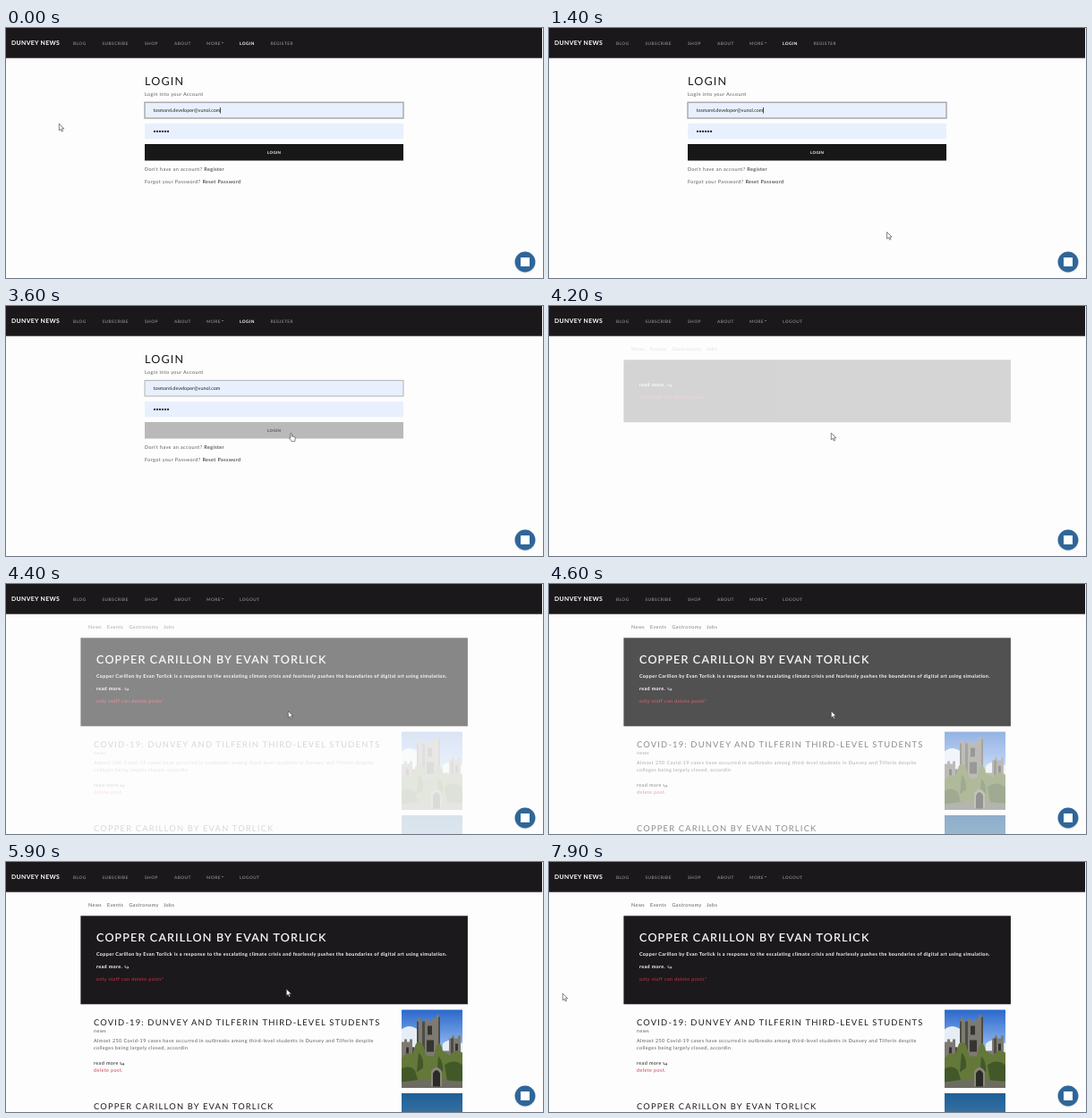
These frames come from a looping animation (600x280 px, 8000 ms). An HTML page:

```html
<!DOCTYPE html>
<html lang="en">
<head>
<meta charset="utf-8">
<title>Login demo</title>
<style>
  html, body { margin: 0; width: 100%; height: 100%; overflow: hidden; background: #fdfdfd; }
  svg { display: block; }
  text {
    font: 5.45px Lato, "Open Sans", sans-serif;
    letter-spacing: .4px;
    fill: #55595c;
    text-rendering: geometricPrecision;
    white-space: pre;
  }
  .nav text { font-size: 4.75px; font-weight: 700; letter-spacing: .45px; fill: #838283; }
  .nav .brand { font-size: 6.9px; letter-spacing: .33px; }
  .nav .brand, .nav .on, .card text { fill: #fff; }
  .h1 { font-size: 12.55px; letter-spacing: 1.17px; }
  .h2 { font-size: 9.4px; letter-spacing: 1.17px; }
  .dark, .link { fill: #1a1a1a; }
  .card .h1 { stroke: #fff; stroke-width: .2px; }
  .card .bold { font-weight: 700; letter-spacing: .33px; }
  .card .red, .red { fill: #d2364a; }
  .field { fill: #e8f0fe; }
  .input { letter-spacing: 0; fill: #222; }
  #label { font-size: 4.4px; font-weight: 700; letter-spacing: .35px; text-anchor: middle; }
  .arrow { fill: none; stroke-width: .6; }
</style>
</head>
<body>
<svg width="600" height="280" viewBox="0 0 600 280">
  <defs>
    <linearGradient id="sky" x2="0" y2="1">
      <stop stop-color="#2a68cc"/><stop offset=".4" stop-color="#7fabe8"/><stop offset=".7" stop-color="#d5e0ee"/>
    </linearGradient>
    <linearGradient id="dusk" x2="0" y2="1">
      <stop stop-color="#1f5f98"/><stop offset="1" stop-color="#336f9f"/>
    </linearGradient>
    <path id="turn" class="arrow" d="M0 0v2.4h4M2.6 1l1.5 1.4l-1.5 1.4"/>
  </defs>

  <g class="nav">
    <rect width="599" height="33.7" fill="#1a181a"/>
    <text class="brand" x="6" y="19">DUNVEY NEWS</text>
    <g id="menu"></g>
    <path d="M240.7 15.9h2.6l-1.3 1.4z" fill="#8c8b8c"/>
  </g>

  <g id="login">
    <text class="h1 dark" x="155" y="63.6">LOGIN</text>
    <text x="155" y="75.6">Login into your Account</text>
    <rect id="email" class="field" x="155" y="83.3" width="289" height="17.7" stroke="#a9abae"/>
    <text class="input" x="164.5" y="94.2">tosmarel.developer@vunol.com</text>
    <rect id="caret" x="239.2" y="89" width=".7" height="6.5"/>
    <rect class="field" x="155" y="107" width="289" height="17.3"/>
    <path d="M166 115.8h16" stroke="#111" stroke-width="2.3" stroke-linecap="round" stroke-dasharray="0 3"/>
    <rect id="button" x="155" y="130" width="289" height="18.5"/>
    <text id="label" x="299.7" y="140.9">LOGIN</text>
    <text x="155" y="160.2">Don't have an account? <tspan class="link">Register</tspan></text>
    <text x="155" y="174.2">Forgot your Password? <tspan class="link">Reset Password</tspan></text>
  </g>

  <g id="blog">
    <g id="top">
      <g id="tabs"></g>
      <g class="card">
        <rect id="panel" x="83.4" y="60.3" width="432.5" height="99" fill="#1b191b"/>
        <g id="intro">
          <text class="h1" x="101" y="89.4">COPPER CARILLON BY EVAN TORLICK</text>
          <text class="bold" x="101" y="104.6">Copper Carillon by Evan Torlick is a response to the escalating climate crisis and fearlessly pushes the boundaries of digital art using simulation.</text>
        </g>
        <g id="more">
          <text class="bold" x="101" y="119">read more.</text>
          <use href="#turn" x="133" y="115.8" stroke="#fff"/>
          <text class="red" x="101" y="133">only staff can delete posts*</text>
        </g>
      </g>
    </g>
    <g id="posts">
      <text class="h2 dark" x="98" y="183.2">COVID-19: DUNVEY AND TILFERIN THIRD-LEVEL STUDENTS</text>
      <text x="98" y="191.2">news</text>
      <text x="98" y="202.2">Almost 250 Covid-19 cases have occurred in outbreaks among third-level students in Dunvey and Tilferin despite</text>
      <text x="98" y="210.2">colleges being largely closed, accordin</text>
      <text class="link" x="98" y="227.2">read more</text>
      <use href="#turn" x="128" y="224" stroke="#1a1a1a"/>
      <text class="red" x="98" y="235.2">delete post.</text>
      <text class="h2 dark" x="98" y="276.6">COPPER CARILLON BY EVAN TORLICK</text>
      <g transform="translate(442 165.5)">
        <rect width="68" height="87.5" fill="url(#sky)"/>
        <path d="M0 22q8-7 18 0v34H0zM46 38q10-9 22 0v18H46z" fill="#e6edf5"/>
        <path d="M0 36h3v-3h3v3h3v-3h3v9h5V11l2-3 3 3v2h4v-3h4v3h4v-3h4V8l2-3 3 3v38h10V32h3v-3h3v3h4v-3h3v58.5H0z" fill="#7d7a73"/>
        <path d="M17 13h2v70h-2zM23 13h3v45h-3zM41 8h2v70h-2zM55 32h3v50h-3zM12 42h2v30h-2z" fill="#4d4d45"/>
        <path d="M29 18h5v10h-5zM28 34h8v13h-8zM60 38h3v8h-3zM5 42h3v7H5z" fill="#34352f"/>
        <path d="M0 54q7-8 12-4l4-12q6-6 9 5l3 9h8l3-12q4-7 7 6l8 5q6-8 14-3v34q-20 6-42 1L0 83z" fill="#64783a"/>
        <path d="M0 66q9-5 15 2l4 14H0zM19 48q6 5 5 17l-7 5zM41 52q6 6 5 18l-6-4zM48 62q10-8 20 0v18H51z" fill="#435829"/>
        <path d="M0 81q34-6 68 0v6.5H0z" fill="#6c6d60"/>
        <path d="M33 86V69q6-9 12 0v17z" fill="#8b877c"/>
        <path d="M35 86V71q4-7 8 0v15z" fill="#292b26"/>
      </g>
      <rect x="442" y="259" width="68" height="21" fill="url(#dusk)"/>
    </g>
  </g>

  <circle cx="580" cy="262.5" r="12.2" fill="#000" opacity=".08"/>
  <circle cx="580" cy="262" r="11.4" fill="#2f6699"/>
  <rect x="575" y="257" width="10" height="10" fill="#fff"/>

  <g id="cursor" stroke="#333" stroke-width=".6" stroke-linejoin="round" fill="#fff">
    <path id="pointer" d="M.3 .3v7.6l1.8-1.6 1.2 2.7 1.3-.6-1.2-2.6h2.4z"/>
    <path id="hand" d="M1.8 .9q.9-.9 1.6 0v3l3 .6q1 .3 .9 1.4l-.6 3.8h-3.7l-2.4-3.4q-.2-1.2 1.2-.5z"/>
  </g>
</svg>
<script>
const $ = id => document.getElementById(id);
const show = (id, on) => $(id).style.display = on ? "" : "none";
const set = (id, attrs) => { for (const k in attrs) $(id).setAttribute(k, attrs[k]); };
const clamp = v => Math.min(1, Math.max(0, v));
const grey = v => `rgb(${v},${v},${v})`;

const labels = (y, items) => items.map(([x, s, extra = ""]) =>
  `<text x="${x}" y="${y}" ${extra}>${s}</text>`).join("");

$("menu").innerHTML = labels(18.6, [
  [75, "BLOG"], [107.5, "SUBSCRIBE"], [155, "SHOP"], [188, "ABOUT"], [224, "MORE"],
  [261, "LOGIN", 'id="navLogin" class="on"'], [295.5, "REGISTER", 'id="navRegister"'],
  [261, "LOGOUT", 'id="navLogout"']
]);
$("tabs").innerHTML = labels(50.4, [[92, "News"], [113, "Events"], [137.5, "Gastronomy"], [176, "Jobs"]]);

// time, x, y
const path = [
  [0, 59, 107], [100, 59, 107], [600, 384, 244], [1100, 384, 244], [1900, 366, 202],
  [2300, 335, 173], [2700, 335, 173], [3000, 321, 147], [3400, 316, 142], [3900, 316, 142],
  [4200, 315, 142], [5700, 315, 142], [5900, 313, 142], [6200, 180, 129], [6500, 48, 138],
  [7000, 15, 147], [8000, 15, 147]
];

function cursorAt(t) {
  const i = path.findIndex(p => p[0] > t);
  const [t0, x0, y0] = path[i - 1], [t1, x1, y1] = path[i];
  const k = (t - t0) / (t1 - t0);
  return [x0 + (x1 - x0) * k, y0 + (y1 - y0) * k];
}

// CSS "ease": cubic-bezier(.25, .1, .25, 1)
function ease(x) {
  const curve = (s, a, b) => 3 * (1 - s) ** 2 * s * a + 3 * (1 - s) * s * s * b + s ** 3;
  let lo = 0, hi = 1;
  for (let i = 0; i < 20; i++) {
    const mid = (lo + hi) / 2;
    if (curve(mid, .25, .25) < x) lo = mid; else hi = mid;
  }
  return curve(lo, .1, 1);
}
const fade = (t, start) => ease(clamp((t - start) / 1300));

function draw(t) {
  const inside = t >= 3900, loaded = t > 4200;
  for (const id of ["login", "navLogin", "navRegister"]) show(id, !inside);
  for (const id of ["blog", "navLogout"]) show(id, inside);

  const focused = t < 3600;
  show("caret", t < 600 || (focused && Math.floor((t - 600) / 525) % 2 === 1));
  set("email", { "stroke-width": focused ? 1.5 : .9 });
  const hover = clamp((t - 3000) / 300);
  set("button", { fill: grey(24 + 161 * hover) });
  set("label", { style: `fill:${grey(255 - 175 * hover)}` });

  set("top", { opacity: fade(t, 4010) });
  set("posts", { opacity: fade(t, 4220) });
  show("intro", loaded);
  show("posts", loaded);
  set("panel", { height: loaded ? 99 : 70 });
  set("more", { transform: `translate(0 ${loaded ? 0 : -29})` });

  const onButton = t >= 3000 && !inside;
  show("hand", onButton);
  show("pointer", !onButton);
  set("cursor", { transform: `translate(${cursorAt(t)})` });
}

const start = performance.now();
function tick() {
  const t = (performance.now() - start) % 8000;
  draw(Math.floor(t / 100) * 100);
  requestAnimationFrame(tick);
}
tick();
</script>
</body>
</html>
```
